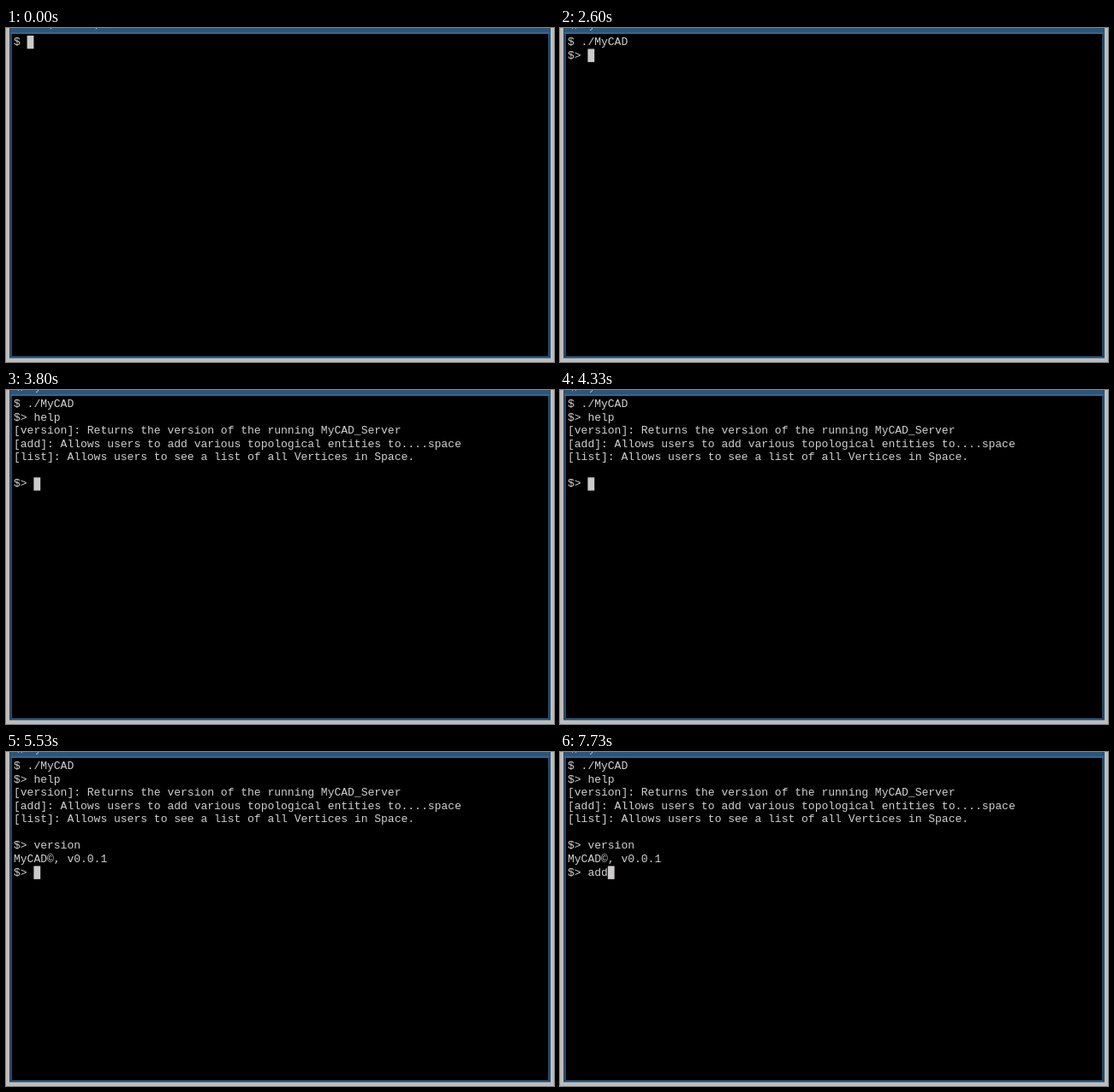
Recreate the animation shown at these times as an HTML page. Size 640 by 391 pixels, loop 8000 ms.

```html
<!DOCTYPE html>
<html lang="en">
<head>
<meta charset="utf-8">
<title>Terminal session</title>
<style>
html, body { margin: 0; width: 100%; height: 100%; overflow: hidden; background: #bebdbb; }
svg { display: block; width: 640px; height: 391px; }
text { font: 13px "Liberation Mono", monospace; fill: #d0d0d0; white-space: pre; }
</style>
</head>
<body>
<svg viewBox="0 0 640 391">
  <rect width="640" height="391" fill="#bebdbb"/>
  <rect x="4" width="632" height="386.5" fill="#234a6c"/>
  <rect x="5" width="630" height="5.5" fill="#2b567c"/>
  <rect x="5" y="5.5" width="630" height="1" fill="#4f7ba1"/>
  <rect x="7" y="7" width="626" height="377" fill="#000"/>
  <g fill="none" stroke="#c3d0dc" stroke-width="1">
    <path id="idle" d="M53 0l-1 1.2M106 0l-1 1.2"/>
    <path id="busy" d="M14.5 0v.8M18.6 0l-.4 .9M37.8 0l-1 1.8q-.5 .8-1.8 .6"/>
  </g>
  <g id="rows"></g>
  <rect id="cursor" width="7.8" height="15.4" fill="#cccaca"/>
</svg>
<script>
const LOOP = 8000, LEFT = 9, CELL = 7.8, PITCH = 15.57;
const $ = id => document.getElementById(id);

// Each command: prompt, time shown, typed text, time of every key
const commands = [
  { at: 0, prompt: "$ ", text: "./MyCAD", keys: [1200, 1270, 1330, 1600, 1670, 1800, 1870], out: [] },
  { at: 2600, prompt: "$> ", text: "help", keys: [3130, 3200, 3330, 3400], out: [
    "[version]: Returns the version of the running MyCAD_Server",
    "[add]: Allows users to add various topological entities to....space",
    "[list]: Allows users to see a list of all Vertices in Space.",
    ""] },
  { at: 3800, prompt: "$> ", text: "version", keys: [4600, 4670, 4800, 4870, 4930, 5070, 5130],
    out: ["MyCAD©, v0.0.1"] },
  { at: 5470, prompt: "$> ", text: "add", keys: [7400, 7470, 7670], out: [] }
];

const rows = Array.from({ length: 9 }, (_, i) => {
  const el = document.createElementNS("http://www.w3.org/2000/svg", "text");
  el.setAttribute("x", LEFT);
  el.setAttribute("y", 20 + i * PITCH);
  return $("rows").appendChild(el);
});

function screen(t) {
  const lines = [];
  commands.forEach((c, i) => {
    if (t < c.at) return;
    const typed = c.keys.filter(k => t >= k).length;
    lines.push(c.prompt + c.text.slice(0, typed));
    const next = commands[i + 1];
    if (next && t >= next.at) lines.push(...c.out);
  });
  return lines;
}

function draw(t) {
  const lines = screen(t);
  rows.forEach((el, i) => {
    const line = lines[i] || "";
    if (el.textContent !== line) el.textContent = line;
  });
  const last = lines.length - 1;
  $("cursor").setAttribute("x", LEFT + lines[last].length * CELL);
  $("cursor").setAttribute("y", 8.9 + last * PITCH);
  const running = t >= commands[1].at;
  $("idle").style.display = running ? "none" : "";
  $("busy").style.display = running ? "" : "none";
}

const start = performance.now();
function tick() {
  draw((performance.now() - start) % LOOP);
  requestAnimationFrame(tick);
}
tick();
</script>
</body>
</html>
```
